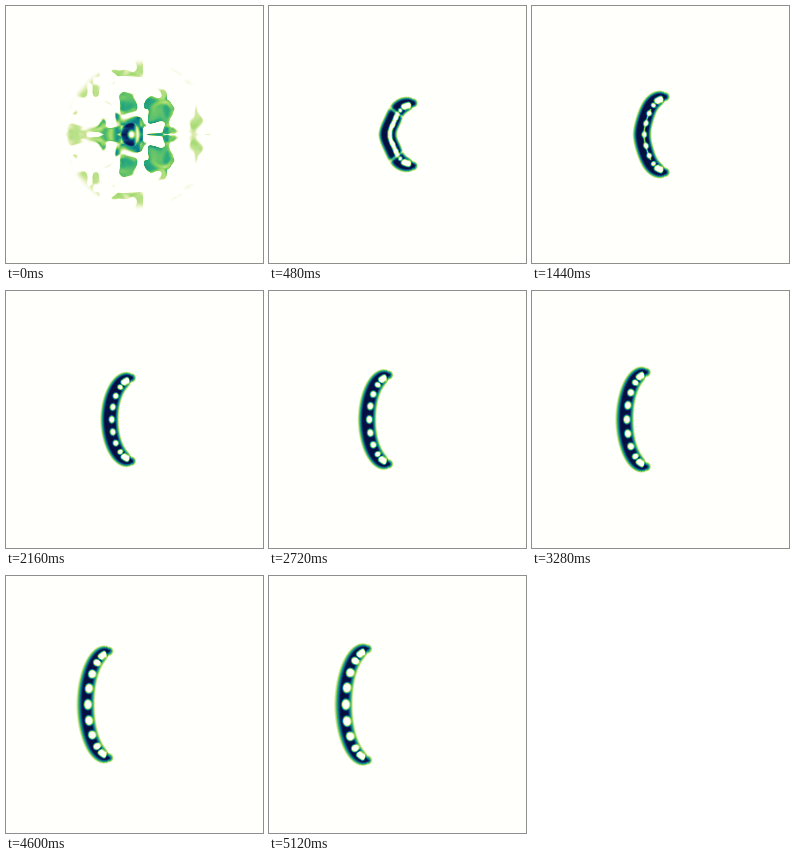
Recreate the animation shown at these times as an HTML page with a canvas. Size 257 by 257 pixels, loop 5160 ms.

```html
<!DOCTYPE html>
<html lang="en">
<head>
<meta charset="utf-8">
<style>
  html, body { margin: 0; width: 100%; height: 100%; overflow: hidden; background: #fffffb; }
  canvas { display: block; width: 257px; height: 257px; }
</style>
</head>
<body>
<canvas id="stage" width="257" height="257"></canvas>
<script>
const SIZE = 257, MID = 128, LOOP = 5160, STEP = 40;
const HALF = 78, X0 = 56, X1 = 208;
const ctx = document.getElementById('stage').getContext('2d');
const image = ctx.createImageData(SIZE, SIZE);
const clamp = (v, a, b) => Math.min(b, Math.max(a, v));
const smooth = v => { v = clamp(v, 0, 1); return v * v * (3 - 2 * v); };
const mix = (a, b, k) => a + (b - a) * k;

const RAMP = ['fffffb', 'dcebac', '8ed45e', '2fae7a', '0e838c', '0c4a80', '081c54', '061040'];
const LUT = Array.from({ length: 256 }, (_, i) => {
  const pos = i / 255 * (RAMP.length - 1), j = Math.min(RAMP.length - 2, Math.floor(pos));
  const part = (hex, c) => parseInt(hex.substr(c * 2, 2), 16);
  return [0, 1, 2].map(c => Math.round(mix(part(RAMP[j], c), part(RAMP[j + 1], c), pos - j)));
});

// The body is a band along an elliptic arc that drifts left and grows taller.
function bodyAt(t) {
  const k = clamp((t - 480) / 4640, 0, 1);
  const rx = 24 - 2.5 * Math.sin(Math.PI * k), ry = 31.5 + 24 * k ** 0.85;
  const cx = 119.5 - 45.5 * k + rx;
  const arc = Array.from({ length: 21 }, (_, i) => {
    const a = i / 20 * Math.PI / 2;
    return [cx - rx * Math.cos(a), ry * Math.sin(a)];
  });
  let length = 0;
  for (let i = 1; i < arc.length; i++) {
    length += Math.hypot(arc[i][0] - arc[i - 1][0], arc[i][1] - arc[i - 1][1]);
  }
  return { k, rx, ry, cx, arc, length, early: 1 - smooth(k * 2.6), fresh: 1 - smooth(k * 8) };
}

// Distance from the arc (negative outside it) and position along it, 0 to 1.
function locate(body, x, h) {
  const { arc, cx, rx, ry } = body, n = arc.length - 1;
  let best = 1e9, u = 0;
  for (let i = 0; i < n; i++) {
    const [ax, ay] = arc[i], dx = arc[i + 1][0] - ax, dy = arc[i + 1][1] - ay;
    const s = clamp(((x - ax) * dx + (h - ay) * dy) / (dx * dx + dy * dy), 0, 1);
    const d = Math.hypot(x - ax - s * dx, h - ay - s * dy);
    if (d < best) { best = d; u = (i + s) / n; }
  }
  const inside = Math.hypot((x - cx) / rx, h / ry) < 1;
  return [inside ? best : -best, u];
}

function bodyField(body, x, h) {
  const { k, early, fresh, length } = body;
  let [e, u] = locate(body, x, h);
  if (Math.abs(e) > 13) return 0;
  e += early * 1.3 * Math.cos(u * 9) * (1 - u);
  const r = 9.8 - u - 3.6 * u ** 8;
  const soft = e < 0 ? mix(4.5, 7.5 - 2.5 * u, k) : mix(4, 6, k);
  let v = clamp((r - Math.abs(e)) / soft, 0, 1);

  // White gaps: beads at even steps, a slot near the tip, and a groove while young.
  const gap = (from, to, offset, radius) => {
    const along = (u - clamp(u, from, to)) * length;
    v *= smooth((Math.hypot(along, e - offset) - radius + 1) / 3.2);
  };
  for (let i = 0; i < 4; i++) gap(i * 0.2, i * 0.2, 2.3, mix(1.6, 3.6, k));
  gap(0.74, 0.87, 1.8, 2.8);
  if (early > 0) gap(0.06, 0.48, 2, 3.2 * early - 1.5);
  return v * (1 - 0.6 * fresh * Math.exp(-(((u - 0.5) * length / 1.8) ** 2)));
}

function hash(i, j) {
  const s = Math.sin(i * 127.1 + j * 311.7 + 4.2) * 43758.5453;
  return s - Math.floor(s);
}

function noise(x, y) {
  const i = Math.floor(x), j = Math.floor(y), fx = smooth(x - i), fy = smooth(y - j);
  return mix(mix(hash(i, j), hash(i + 1, j), fx), mix(hash(i, j + 1), hash(i + 1, j + 1), fx), fy);
}

// Opening splash: warped noise, teal near the middle and pale at the edge.
function splash(x, h) {
  const far = Math.hypot(x - 132, h);
  const wx = x / 10 + 1.6 * noise(x / 13 + 40, h / 13);
  const wy = h / 10 + 1.6 * noise(x / 13, h / 13 + 70);
  const n = noise(wx, wy), fold = noise(wx * 1.7 + 9, wy * 1.7 + 5);
  const level = 0.1 + 0.5 * Math.exp(-((far / 52) ** 2));
  const cover = smooth((n - 0.42 - 0.16 * (far / 72) ** 4) / 0.12) * smooth((76 - far) / 8);
  const sheet = level * cover * (0.45 + 0.75 * fold);
  const ring = Math.hypot(x - 125, h * 0.85);
  const core = smooth(1.3 - Math.abs(ring - 7) / 4.5) * smooth((132 - x) / 6) * (0.6 + 0.4 * fold);
  return Math.max(core, sheet * smooth((ring - 5) / 6));
}

const start = Array.from({ length: HALF + 1 }, (_, h) =>
  Float32Array.from({ length: X1 - X0 }, (_, i) => splash(X0 + i, h)));

function put(x, y, c) {
  const p = (y * SIZE + x) * 4;
  for (let i = 0; i < 3; i++) image.data[p + i] = c[i];
  image.data[p + 3] = 255;
}

for (let y = 0; y < SIZE; y++) for (let x = 0; x < SIZE; x++) put(x, y, LUT[0]);

let shown = -1;
function draw(t) {
  const n = Math.max(1, Math.floor(t / STEP));
  if (n === shown) return;
  shown = n;
  // Each step can move a cell by at most a tenth towards the body.
  const body = bodyAt(n * STEP), reach = (n - 1) * 0.1;
  for (let h = 0; h <= HALF; h++) {
    for (let x = X0; x < X1; x++) {
      const from = start[h][x - X0];
      const v = from + clamp(bodyField(body, x, h) - from, -reach, reach);
      const c = LUT[Math.round(clamp(v, 0, 1) * 255)];
      put(x, MID - h, c);
      put(x, MID + h, c);
    }
  }
  ctx.putImageData(image, 0, 0);
}

const begin = performance.now();
function tick() {
  draw((performance.now() - begin) % LOOP);
  requestAnimationFrame(tick);
}
tick();
</script>
</body>
</html>
```
